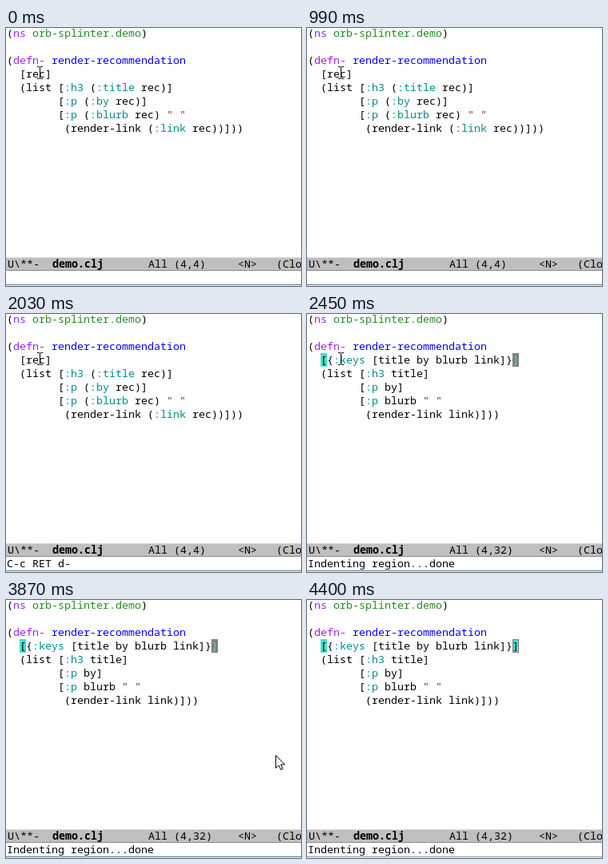
Write an HTML page with a canvas that moves like this. It is 369 px wide and 323 px high and loops after 4.45 s.

```html
<!DOCTYPE html>
<html lang="en">
<head>
<meta charset="utf-8">
<title>Editor: destructuring keys</title>
<style>
html, body { margin: 0; width: 100%; height: 100%; overflow: hidden; background: #fff; }
canvas { display: block; }
</style>
</head>
<body>
<canvas id="stage" width="369" height="323"></canvas>
<script>
const ctx = document.getElementById('stage').getContext('2d');
const LOOP = 4450, CW = 8, ROW = 17, LEFT = 1, TOP = -2, ASCENT = 13;
const FONT = '13.333px "Noto Sans Mono", "DejaVu Sans Mono", monospace';
const GREY = '#808080', MATCH = '#40e0d0';

const HEAD = ['(ns orb-splinter.demo)', '', '(defn- render-recommendation'];
const BEFORE = [...HEAD,
  '  [rec]',
  '  (list [:h3 (:title rec)]',
  '        [:p (:by rec)]',
  '        [:p (:blurb rec) " "',
  '         (render-link (:link rec))]))'];
const AFTER = [...HEAD,
  '  [{:keys [title by blurb link]}]',
  '  (list [:h3 title]',
  '        [:p by]',
  '        [:p blurb " "',
  '         (render-link link)]))'];

const TOKEN = /:\w+|" "|orb-splinter\.demo|render-recommendation|defn-|\bns\b|[^\s:"]+?(?=:|\bns\b|defn-|\s|$)|\S/g;

function tokenColor(word) {
  if (word[0] === ':') return '#008b8b';
  if (word[0] === '"') return '#8b2252';
  if (word === 'ns' || word === 'defn-') return '#a020f0';
  if (word === 'orb-splinter.demo') return '#228b22';
  if (word === 'render-recommendation') return '#0000ff';
  return '#000';
}

function rect(x, y, w, h, color) {
  ctx.fillStyle = color;
  ctx.fillRect(x, y, w, h);
}

function text(str, x, baseline, color = '#000', bold = false) {
  ctx.font = (bold ? 'bold ' : '') + FONT;
  ctx.fillStyle = color;
  ctx.fillText(str, x, baseline);
}

const colX = col => LEFT + col * CW;
const rowY = row => TOP + row * ROW;

function cell(row, col, char, back, color) {
  rect(colX(col), rowY(row), CW, ROW, back);
  text(char, colX(col), rowY(row) + ASCENT, color);
}

function drawCode(lines) {
  lines.forEach((line, row) => {
    for (const m of line.matchAll(TOKEN))
      text(m[0], colX(m.index), rowY(row) + ASCENT, tokenColor(m[0]));
  });
}

function drawModeLine(position) {
  rect(0, 287, 369, 17, '#bfbfbf');
  rect(0, 287, 369, 1, '#d8d8d8');
  rect(0, 303, 369, 1, '#8c8c8c');
  const put = (str, col, bold) => text(str, 2 + col * CW, 300, '#000', bold);
  put('U\\**-', 0);
  put('demo.clj', 7, true);
  put('All', 22);
  put(position, 26);
  put('<N>', 36);
  put('(Clo', 42);
}

function drawBeam() {
  rect(42, 49, 1, 14, '#000');
  for (const y of [48, 63]) {
    rect(39, y, 3, 1, '#000');
    rect(43, y, 3, 1, '#000');
  }
}

const ARROW = new Path2D('M.5 .5V16.5L4.2 13L6.8 18.5L9.2 17.4L6.7 12H11.5Z');
function drawArrow(x, y) {
  ctx.save();
  ctx.translate(x, y);
  ctx.fillStyle = '#fff';
  ctx.fill(ARROW);
  ctx.strokeStyle = '#000';
  ctx.lineWidth = 1;
  ctx.stroke(ARROW);
  ctx.restore();
}

function echo(t) {
  if (t >= 2450) return 'Indenting region...done';
  if (t >= 1900) return 'C-c RET d-';
  return t >= 1460 ? 'C-c RET-' : '';
}

const within = (t, a, b) => t >= a && t < b;

function draw(t) {
  const done = t >= 2450, focused = t < 4280;
  rect(0, 0, 369, 323, '#fff');
  drawCode(done ? AFTER : BEFORE);

  if (done) {
    const on = within(t, 2450, 3010) || within(t, 3430, 3990);
    cell(3, 2, '[', MATCH, '#000');
    cell(3, 32, ']', on ? GREY : MATCH, on ? MATCH : '#000');
    if (t >= 4400) {
      ctx.strokeStyle = GREY;
      ctx.lineWidth = 1;
      ctx.strokeRect(colX(32) + .5, rowY(3) + .5, CW - 1, ROW - 1);
    }
  } else if (within(t, 550, 990) || within(t, 1600, 2030)) {
    cell(3, 4, 'e', GREY, '#fff');
  }

  drawModeLine(done ? '(4,32)' : '(4,4)');
  text(echo(t), LEFT, 317);
  rect(0, 321, 369, 1, focused ? '#4d7590' : '#8b9aa5');

  if (t < 3870) drawBeam();
  else if (t < 3990) drawArrow(337, 194);
  else if (t < 4140) drawArrow(359, 286);
  else if (focused) drawArrow(360, 306);
}

const start = performance.now();
function tick() {
  draw((performance.now() - start) % LOOP);
  requestAnimationFrame(tick);
}
tick();
</script>
</body>
</html>
```
